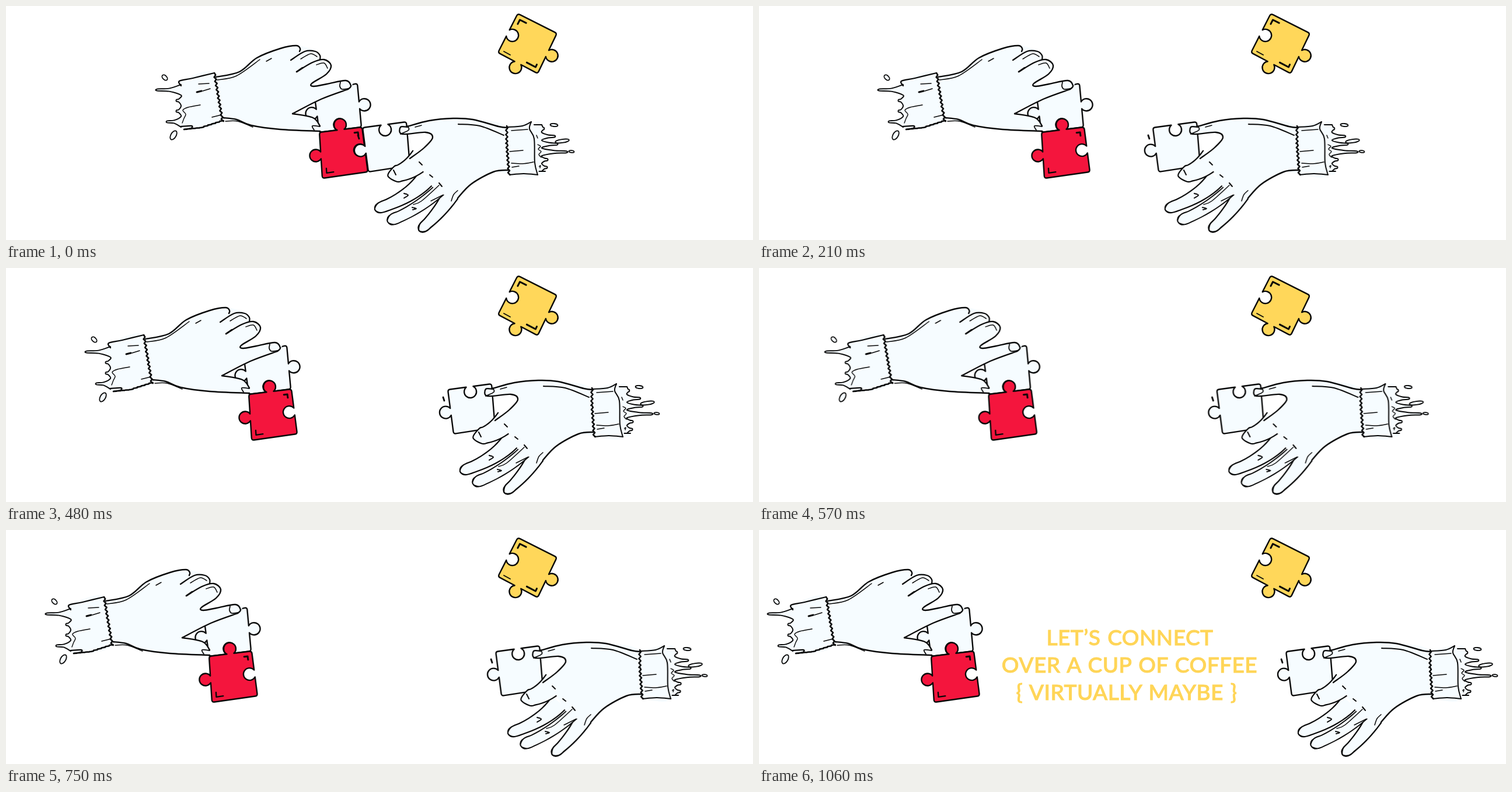
Recreate the animation shown at these times as an HTML page. Size 1280 by 402 pixels, loop 2.26 s.

```html
<!DOCTYPE html>
<html lang="en">
<head>
<meta charset="utf-8">
<title>Let's connect</title>
<style>
  html, body { margin: 0; width: 100%; height: 100%; overflow: hidden; background: #fff; }
  svg { display: block; width: 100%; height: 100%; }
  path, ellipse { stroke: #080808; stroke-linecap: round; stroke-linejoin: round; }
  text {
    font: 500 37px Lato, "Open Sans", sans-serif;
    letter-spacing: .5px;
    word-spacing: 2px;
    text-anchor: middle;
    fill: #ffd557;
    stroke: #ffd557;
    stroke-width: 1px;
  }
</style>
</head>
<body>
<svg viewBox="0 0 1280 402">
  <g id="loose"></g>
  <g id="left"></g>
  <g id="right"></g>
  <g id="words">
    <text x="635.5" y="197.5">LET’S CONNECT</text>
    <text x="635" y="244.5">OVER A CUP OF COFFEE</text>
    <text x="630" y="291.5">{ VIRTUALLY MAYBE }</text>
  </g>
</svg>
<script>
const LOOP = 2260, MOVE_END = 960, TEXT_AT = 1060, STEPS = 32;
const LIGHT = '#f6fcff', RED = '#f4153d', YELLOW = '#ffd75a';
const byId = id => document.getElementById(id);
const mix = (a, b, k) => a + (b - a) * k;
const move = ([x, y], [dx, dy], k) => [x + dx * k, y + dy * k];
const toward = ([ax, ay], [bx, by]) => {
  const len = Math.hypot(bx - ax, by - ay);
  return [(bx - ax) / len, (by - ay) / len];
};
const points = text => text.trim().split(/\s+/).map(p => p.split(',').map(Number));

let layer;

function add(tag, attrs) {
  const el = document.createElementNS('http://www.w3.org/2000/svg', tag);
  for (const key in attrs) el.setAttribute(key, attrs[key]);
  layer.append(el);
}

const draw = (d, fill, width) => add('path', { d, fill, 'stroke-width': width });

// Smooth curve through points.
function curve(p) {
  let d = 'M' + p[0];
  for (let i = 0; i < p.length - 1; i++) {
    const a = p[i - 1] || p[i], b = p[i], c = p[i + 1], e = p[i + 2] || c;
    const h1 = [0, 1].map(k => b[k] + (c[k] - a[k]) / 6);
    const h2 = [0, 1].map(k => c[k] - (e[k] - b[k]) / 6);
    d += `C${h1} ${h2} ${c}`;
  }
  return d;
}

const ink = (text, width = 2.3) => draw(curve(points(text)), 'none', width);
const fill = text => draw(curve(points(text)) + 'Z', LIGHT, 0);
const dashes = (text, width = 1.5) =>
  text.split('|').forEach(part => ink(part, width));

// Four corners clockwise; each side is a knob (1), a socket (-1) or flat (0).
function piece(corners, sides, color) {
  const c = points(corners), round = 4, neck = 6, bulb = 10.5;
  let d = '';
  c.forEach((a, i) => {
    const b = c[(i + 1) % 4], u = toward(a, b);
    const mid = [mix(a[0], b[0], .5), mix(a[1], b[1], .5)];
    const start = move(a, u, round);
    d += i ? `Q${a} ${start}` : `M${start}`;
    if (sides[i]) {
      d += `L${move(mid, u, -neck)}A${bulb} ${bulb} 0 1 ${sides[i] > 0 ? 1 : 0} ${move(mid, u, neck)}`;
    }
    d += `L${move(b, u, -round)}`;
  });
  draw(d + `Q${c[0]} ${move(c[0], toward(c[0], c[1]), round)}Z`, color, 2.4);
}

// Shine mark set inside a corner, with arms along both sides.
function shine(corner, next, prev, arm1, arm2, width) {
  const [c, n, p] = [corner, next, prev].map(t => points(t)[0]);
  const u = toward(c, n), v = toward(c, p);
  const at = move(move(c, u, 8), v, 8);
  draw(`M${move(at, u, arm1)}L${at}L${move(at, v, arm2)}`, 'none', width);
}

// Tapered finger around a bent centre line, with a nail at the tip.
function finger(text, tipWidth, baseWidth, width, nail = true) {
  const [tip, bend, base] = points(text), sides = [[], []], n = 6;
  for (let i = 0; i <= n; i++) {
    const k = i / n, w = mix(tipWidth, baseWidth, k);
    const from = [0, 1].map(j => mix(tip[j], bend[j], k));
    const to = [0, 1].map(j => mix(bend[j], base[j], k));
    const [ux, uy] = toward(from, to), at = [0, 1].map(j => mix(from[j], to[j], k));
    sides[0].unshift(move(at, [uy, -ux], w));
    sides[1].push(move(at, [-uy, ux], w));
  }
  const cap = move(tip, toward(bend, tip), tipWidth);
  draw(curve([...sides[0], cap, ...sides[1]]), LIGHT, width);
  if (nail) {
    const r = tipWidth;
    draw(`M${sides[0][n]}A${r} ${r} 0 0 0 ${sides[1][0]}`, 'none', 1.5);
  }
}

// Torn cloth: rounded tongues of given reach between two heights.
function torn(x, top, bottom, reach) {
  const step = (bottom - top) / reach.length, p = [[x, top]];
  reach.forEach((r, i) => {
    const y = top + step * (i + .5);
    p.push([x + r * .5, y - 2.5], [x + r, y - 1.5], [x + r, y + 1.5],
      [x + r * .5, y + 2.5], [x, y + step / 2]);
  });
  draw(curve(p), LIGHT, 2);
}

// Ribbed seam.
function knit(x1, y1, x2, y2) {
  const count = Math.round(Math.hypot(x2 - x1, y2 - y1) / 3.6);
  let d = `M${x1} ${y1}`;
  for (let i = 1; i <= count; i++) {
    const k = i / count;
    d += `L${mix(x1, x2, k) + (i % 2 ? 1.6 : -1.6)} ${mix(y1, y2, k)}`;
  }
  draw(d, 'none', 2.6);
}

const drop = (cx, cy, rx, ry, turn) => add('ellipse', {
  cx, cy, rx, ry, transform: `rotate(${turn} ${cx} ${cy})`, fill: LIGHT, 'stroke-width': 1.8
});

function drawLoose() {
  piece('877,13 944,47 911,116 843,80', [0, 1, 1, -1], YELLOW);
  shine('877,13', '944,47', '843,80', 12, 8, 3);
  shine('911,116', '843,80', '944,47', 17, 5, 3);
  dashes('853,78 864,84', 1.8);
}

function drawLeft() {
  piece('528,150 602,133 609,208 537,217', [0, 1, -1, 1], LIGHT);
  piece('537,217 610,208 620,285 542,296', [1, -1, 0, 1], RED);
  shine('610,208', '620,285', '537,217', 6, 6, 3);
  shine('542,296', '537,217', '620,285', 8, 12, 2.3);

  // sleeve
  fill('297,129 357,115 371,197 305,211 298,190 299,150');
  torn(300, 135, 208, [-41, -8, -8, -24]);
  ink('300,137 297,129 320,124 357,115');
  ink('300,207 318,206 317,210 305,212');
  knit(305, 212, 334, 209);
  knit(334, 209, 371, 197);
  ink('333,170 312,174 303,179 308,186 305,193 302,201', 1.4);
  dashes('330,134 348,133 | 337,146 350,142 | 353,191 369,187');
  dashes('327,148 335,146', 3);
  drop(272, 123, 5.5, 3.5, 45);
  drop(287, 222, 8.5, 4.5, -60);

  // hand
  fill(`360,121 400,113 430,89 470,73 500,68 532,78 541,92 557,102 549,117
    526,136 582,128 591,138 540,160 491,185 526,192 538,214 470,212 420,205 372,192`);
  ink('360,122 400,113 430,89 470,73 497,68 504,73 503,78', 2.4);
  ink('488,93 512,78 530,78 538,85 538,92');
  ink('498,113 525,97 545,92 557,102 549,117 524,133 527,138 550,134 582,128 591,137 586,143', 2.4);
  ink('586,143 540,160 491,185');
  ink('491,185 526,192 538,206');
  ink('372,192 395,195 420,205 470,212 538,215', 2.4);
  ink('573,131 572,138 576,143 586,142', 1.8);
  ink('538,207 525,206 528,213', 1.8);
  dashes(`362,127 395,120 435,92 | 446,95 455,90 | 505,91 522,82 533,87 |
    532,101 545,98 551,107 | 376,198 397,198 423,208`);
  dashes('498,113 508,106', 2.6);
  knit(357, 115, 371, 198);
}

function drawRight() {
  piece('611,209 686,199 692,274 621,285', [-1, 0, 0, 1], LIGHT);
  dashes('603,222 605,228', 2.8);

  // sleeve
  fill('900,204 917,204 924,284 908,284');
  torn(918, 204, 284, [4, 22, 26, 42, 10, 9]);
  dashes('901,204 918,204 | 924,284 910,284', 2);
  ink('911,238 916,241 912,246 917,250 913,255 917,260', 1.4);
  dashes('913,276 916,274 915,278 | 909,222 911,227');
  drop(939, 204.5, 6.5, 2.5, 6);
  drop(953, 232, 12, 3, -8);
  drop(969, 250, 4.5, 1.8, 8);

  // hand
  finger('714,381 742,357 762,324', 8, 14, 2.3);
  finger('662,367 706,350 745,314', 9, 11, 1.9);
  finger('640,347 693,329 720,296', 8.5, 16, 2.2);
  finger('667,289 692,284 712,262', 13, 20, 2.2, false);
  fill(`688,207 725,197 766,193 800,195 858,209 862,283 835,285 797,306 774,330
    748,323 729,308 713,281 694,262 716,244 731,226 719,217 679,220 676,208`);
  ink('688,207 725,197 766,193 800,195 844,207 858,209', 2.5);
  ink('688,208 676,208 679,220 719,217 731,226 716,244 692,262');
  ink('688,206 690,213 676,220', 1.8);
  ink('774,330 797,306 835,285 861,282', 2.5);
  ink('748,325 728,335', 1.4);
  ink('742,308 712,335 698,341', 1.5);
  ink('775,203 812,206 853,222', 2);
  dashes('682,322 689,325 682,330 | 696,346 703,348 697,350', 2);
  dashes('708,268 713,273 | 726,290 731,294 | 742,304 747,310 | 664,282 668,290', 2);
  dashes('763,335 767,324 774,317 | 701,208 712,205');

  // cuff
  fill('859,208 900,200 905,224 911,290 863,290');
  ink('859,208 885,206 900,199', 2);
  ink('900,199 897,211 905,228 906,269 911,290', 2);
  ink('911,290 887,288 863,290', 2);
  dashes('866,214 894,212 | 863,250 886,248 | 866,270 885,271 904,268 | 867,277 879,275');
  knit(858, 206, 858, 236);
  knit(858, 236, 862, 290);
}

for (const [id, paint] of Object.entries({ loose: drawLoose, left: drawLeft, right: drawRight })) {
  layer = byId(id);
  paint();
}

const play = (id, frames) => byId(id).animate(frames, { duration: LOOP, iterations: Infinity });

function slide(id, dx) {
  const end = `translateX(${dx}px)`;
  play(id, [
    { offset: 0, transform: 'translateX(0px)', easing: `steps(${STEPS}, end)` },
    { offset: MOVE_END / LOOP, transform: end },
    { offset: 1, transform: end }
  ]);
}

slide('left', -242);
slide('right', 292);
play('words', [
  { offset: 0, opacity: 0 },
  { offset: TEXT_AT / LOOP, opacity: 0 },
  { offset: TEXT_AT / LOOP, opacity: 1 },
  { offset: 1, opacity: 1 }
]);
</script>
</body>
</html>
```
